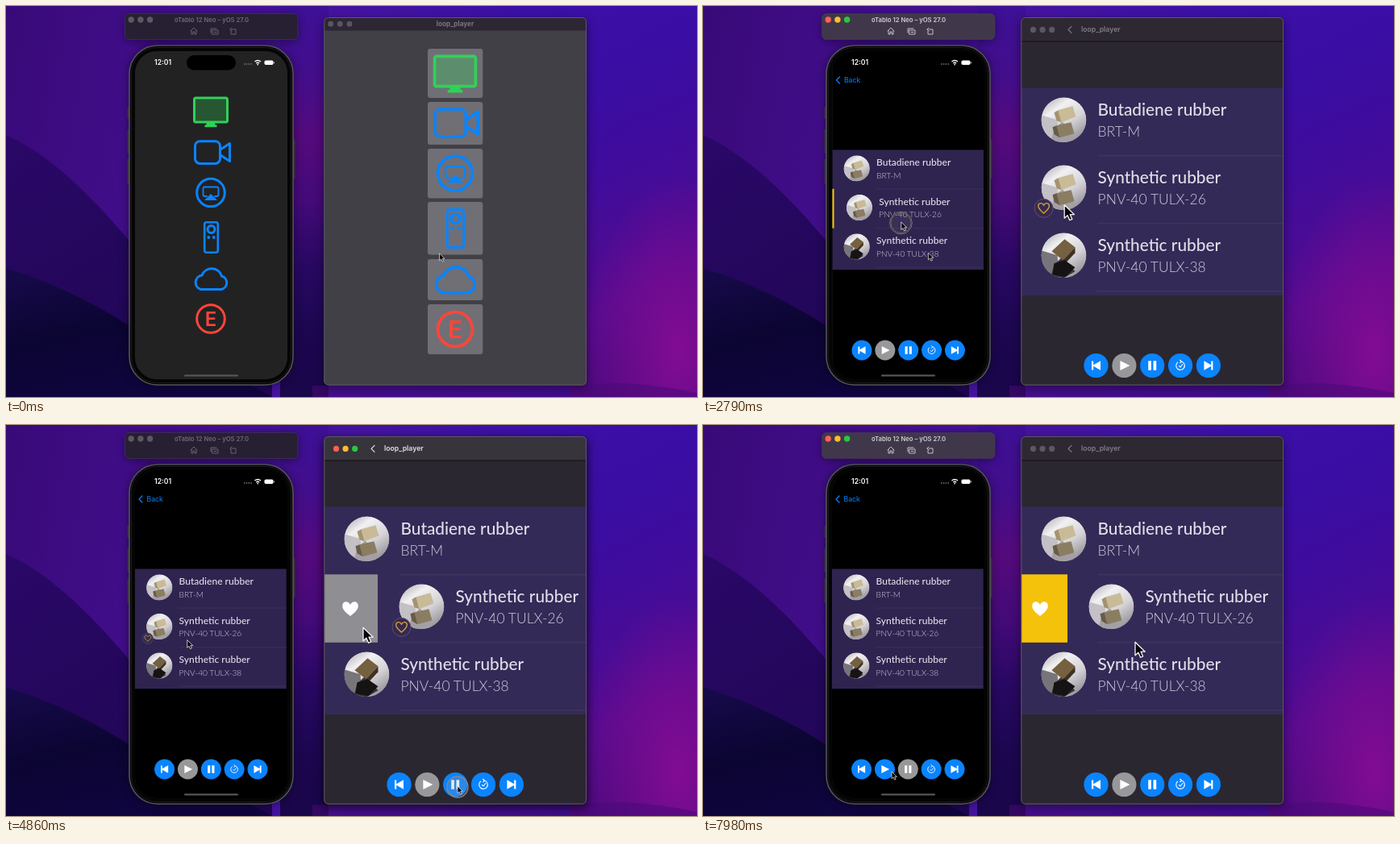
Recreate the animation shown at these times as an HTML page. Size 857 px wide and 485 px high, loop 8000 ms.

```html
<!DOCTYPE html>
<html lang="en">
<head>
<meta charset="utf-8">
<title>Loop player demo</title>
<style>
html, body { margin: 0; width: 100%; height: 100%; overflow: hidden; background: #1c0850; }
svg { display: block; width: 100vw; height: 100vh; }
text { font-family: Inter, Roboto, sans-serif; }
.list text { font-family: Lato, "Open Sans", sans-serif; }
.line { fill: none; stroke: currentColor; stroke-width: 3; stroke-linejoin: round; stroke-linecap: round; }
.solid { fill: currentColor; }
</style>
</head>
<body>
<svg id="stage" viewBox="0 0 857 485"></svg>
<script>
const LOOP = 8000;
const BLUE = '#0a84ff', GREEN = '#30d158', RED = '#ff453a', GRAY = '#98989b';
const LIGHTS = ['#ff5f57', '#febc2e', '#28c840'];

const at = (x, y, body, scale = 1) =>
  `<g transform="translate(${x} ${y}) scale(${scale})">${body}</g>`;
const rect = (x, y, w, h, r, attrs) =>
  `<rect x="${x}" y="${y}" width="${w}" height="${h}" rx="${r}" ${attrs}/>`;
const circle = (x, y, r, attrs) => `<circle cx="${x}" cy="${y}" r="${r}" ${attrs}/>`;
const path = (d, attrs) => `<path d="${d}" ${attrs}/>`;
const label = (x, y, size, fill, body, attrs = '') =>
  `<text x="${x}" y="${y}" font-size="${size}" fill="${fill}" ${attrs}>${body}</text>`;

const HEART = 'M0 9C-3 6-10 2-10-4C-10-10-3-11 0-5.500C3-11 10-10 10-4C10 2 3 6 0 9Z';
const ARROW = 'M0 0V16.500L3.900 13L6.600 19L9.700 17.700L7.100 11.900H12.300Z';

const arrow = path(ARROW, 'fill="#050505" stroke="#f4f2f5" stroke-width="1.3" stroke-linejoin="round"');

// Menu icons, centred on 0,0
const icons = [
  [GREEN, rect(-20.5, -17, 41, 30, 2, 'class="line" style="fill:currentColor;fill-opacity:.3"') +
    path('M-5 13H5L5.500 16.500H7.500V19.300H-7.500V16.500H-5.500Z', 'class="solid"')],
  [BLUE, rect(-21.5, -13.7, 31, 27.6, 6, 'class="line"') + path('M10-3.500L21.500-11V11L10 3.500', 'class="line"')],
  [BLUE, circle(0, 0, 17.3, 'class="line"') +
    path('M-5 4.500H-7.500Q-9.500 4.500-9.500 2.500V-5Q-9.500-7-7.500-7H7.500Q9.500-7 9.500-5V2.500Q9.500 4.500 7.500 4.500H5',
      'class="line" style="stroke-width:1.8"') +
    path('M0 1.500L8 9.500H-8Z', 'class="solid"')],
  [BLUE, rect(-8.3, -18.8, 16.6, 37.6, 2.5, 'class="line" style="stroke-width:2.6"') +
    circle(0, -10, 4.5, 'class="line"') + circle(-3.2, 0, 1.9, 'class="solid"') + circle(3.2, 0, 1.9, 'class="solid"')],
  [BLUE, path('M-13 13H12.500A8.500 8.500 0 0 0 13-3.500A13 13 0 0 0-11.500-4.500A9 9 0 0 0-13 13Z', 'class="line"')],
  [RED, circle(0, 0, 17.3, 'class="line"') +
    label(0, 8.6, 24, 'currentColor', 'E', 'text-anchor="middle" font-weight="600"')]
];
const icon = (i, x, y, scale) => `<g color="${icons[i][0]}">${at(x, y, icons[i][1], scale)}</g>`;

// Transport buttons
const glyphs = [
  path('M-5.500-5.500H-3.300V-.8L5.500-5.800V5.800L-3.300 .8V5.500H-5.500Z', 'fill="#fff"'),
  path('M-5-6L7 0L-5 6Z', 'fill="#fff"'),
  path('M-5-5.800H-1.300V5.800H-5ZM1.300-5.800H5V5.800H1.300Z', 'fill="#fff"'),
  path('M1.500-5A5.300 5.300 0 1 1-3-4.300M1.500-5L-.8-7M1.500-5L-.6-2.800M-2 .2L0 2L3-2',
    'fill="none" stroke="#fff" stroke-width="1.100"'),
  path('M5.500-5.500H3.300V-.8L-5.500-5.800V5.800L3.300 .8V5.500H5.500Z', 'fill="#fff"')
];
const controls = id => glyphs.map((g, i) =>
  at((i - 2) * 34.85, 0, circle(0, 0, 15.1, `id="${id}Btn${i}" fill="${i === 1 ? GRAY : BLUE}"`) + g)).join('');

// A round photo of two blocks
const photo = dark => {
  const [top, side, low, shade] = dark
    ? ['#75603f', '#3e3022', '#151314', '#39363a'] : ['#c9bb97', '#a3936f', '#8b7d62', '#a39fa5'];
  return `<g clip-path="url(#disc)">${circle(0, 0, 28, 'fill="url(#paper)"')}` +
    path('M-28-6L-8 0L-6 28H-28Z', `fill="${dark ? '#77747a' : '#c3c0c6'}"`) +
    path('M-12 12L-2 2L14 20L0 28L-16 26Z', `fill="${shade}"`) +
    (dark
      ? path('M-15-5L1-20L14-10L-1 6Z', `fill="${top}"`) + path('M-1 6L14-10V-3L1 11Z', `fill="${side}"`) +
        path('M-12 10L1 6L14 15L2 27L-14 24Z', `fill="${low}"`)
      : path('M-7-12L11-17L15-4L-3 3Z', `fill="${top}"`) + path('M-7-12L-3 3L-9 1L-12-9Z', `fill="${side}"`) +
        path('M-9 7L9 3L13 17L-5 22Z', `fill="${low}"`) + path('M-9 7L-5 22L-12 18L-14 9Z', 'fill="#675b48"')) +
    '</g>';
};

const row = (y, title, sub, dark) => at(52.500, y + 40, photo(dark)) +
  label(94.500, y + 34.500, 20.800, '#e2dee8', title, 'font-weight="500"') +
  label(94.500, y + 61, 17.500, '#cfc9dc', sub, 'font-weight="300"');

const list = (id, bg) => `<g class="list" clip-path="url(#listBox)">
  ${rect(0, 0, 325, 258, 0, `fill="${bg}"`)}
  ${path('M94 84.500H325M94 168.500H325M94 252.500H325', 'stroke="#44395f" stroke-width="1"')}
  ${row(0, 'Butadiene rubber', 'BRT-M')}
  <g id="${id}Row">${row(84, 'Synthetic rubber', 'PNV-40 TULX-26')}
    <g id="${id}Badge">${at(27.500, 149.500, circle(0, 0, 11.500, 'fill="#352b50" stroke="#665a78" stroke-width=".8"') +
      path(HEART, 'fill="none" stroke="#dca03a" stroke-width="2" transform="scale(.68)"'))}</g></g>
  ${row(168, 'Synthetic rubber', 'PNV-40 TULX-38', true)}
  <g id="${id}Action">${rect(-100, 84, 98, 84.500, 0, `id="${id}Fill"`)}
    ${at(-36, 127, path(HEART, 'fill="#fff"'), .98)}</g>
  <g id="${id}Hand"><g id="${id}Ring">${circle(-.5, 2, 23.500, 'fill="#fff" fill-opacity=".05" stroke="#17131f" stroke-width="3"') +
    circle(-.5, 2, 24, 'fill="none" stroke="#c9c3a6" stroke-width="1"') +
    circle(-.5, 2, 21.800, 'fill="none" stroke="#c9c3a6" stroke-width=".7"')}</g>${arrow}</g>
</g>`;

const lamps = (id, x, y, step, r) => LIGHTS.map((c, i) => circle(x + i * step, y, r, `class="${id}Lamp"`)).join('');
const chevron = (x, y, color) =>
  path(`M${x + 4} ${y - 4}L${x} ${y}L${x + 4} ${y + 4}`, `class="line" color="${color}" style="stroke-width:1.2"`);

const wallpaper = `
  ${rect(0, 0, 857, 485, 0, 'fill="url(#sky)"')}
  ${path('M0 160Q70 190 160 300L330 400V485H0Z', 'fill="url(#hill)"')}
  ${path('M0 325Q80 350 150 395Q250 440 330 485H0Z', 'fill="url(#dark)"')}
  ${rect(340, 0, 60, 485, 0, 'fill="url(#gap)"')}
  ${rect(700, 0, 157, 485, 0, 'fill="url(#side)"')}
  ${rect(700, 200, 157, 285, 0, 'fill="url(#glow)"')}
  ${path('M380 485V471H715Q770 462 857 480V485Z', 'fill="#4a0a78" opacity=".55"')}`;

const phone = `
  ${rect(151, 47, 207, 426, 37, 'fill="#000" opacity=".35" filter="url(#blur)"')}
  ${[[150.500, 125, 15], [150.500, 153, 30], [150.500, 190, 31], [355.500, 165, 49]]
    .map(([x, y, h]) => rect(x, y, 3, h, 1, 'fill="#35323a"')).join('')}
  ${rect(153, 49, 203, 421, 35, 'fill="#050505" stroke="#56545a" stroke-width="1.600"')}
  ${rect(155.500, 51.500, 198, 416, 32, 'fill="none" stroke="#1c1c1e" stroke-width="1"')}
  <g clip-path="url(#screen)">
    <g id="phoneMenu">${rect(160, 56, 189, 407, 0, 'fill="#222223"')}
      ${[[254, 131], [256, 181.500], [254, 231.500], [254.500, 287], [254.500, 338.500], [254, 388]]
        .map(([x, y], i) => icon(i, x, y, 1)).join('')}</g>
    <g id="phonePage">${rect(160, 56, 189, 407, 0, 'fill="#000"')}
      ${chevron(165, 92, BLUE)}${label(174.500, 95.200, 8.700, BLUE, 'Back')}
      ${at(160, 178.300, list('phone', '#2f2450'), .578)}
      ${at(254.300, 427, controls('phone'), .828)}</g>
  </g>
  ${rect(224, 61, 61, 18.500, 9.250, 'fill="#000"')}
  ${label(184, 73, 8.600, '#fff', '12:01', 'font-weight="600"')}
  ${path('M295 72H305', 'stroke="#77777a" stroke-width="1.300" stroke-dasharray="1.500 1.300"')}
  ${path('M308.500 69Q312.200 65.800 316 69M310.300 71Q312.200 69.500 314.200 71', 'fill="none" stroke="#fff" stroke-width="1.400"')}
  ${circle(312.200, 72.600, .9, 'fill="#fff"')}
  ${rect(320.500, 67.500, 11, 5.500, 1.800, 'fill="#fff"')}${rect(332, 69.200, 1, 2.200, .4, 'fill="#aaa"')}
  ${rect(221, 457.300, 67, 2.200, 1.100, 'fill="#565658"')}
  ${rect(148, 11, 214, 33, 6, 'fill="#000" opacity=".4" filter="url(#blur)"')}
  ${rect(147.500, 9.500, 214.500, 32, 5.500, 'id="toolbar" stroke="#4b4354" stroke-opacity=".5"')}
  ${lamps('phone', 155.200, 17, 11.700, 3.700)}
  <g id="toolText">${label(209, 19.700, 7.700, 'currentColor', 'oTablo 12 Neo – yOS 27.0', 'font-weight="600"')}
    ${path('M229 31L233 27L237 31M230 30.500V35H232V32H234V35H236V30.500', 'class="line" style="stroke-width:.9"')}
    ${path('M254 33V28H261M256 30H263V35H256ZM258 32.500H261', 'class="line" style="stroke-width:.9"')}
    ${path('M280 29H285V35H279V31M278 29L280 27M278 29L280 31', 'class="line" style="stroke-width:.9"')}</g>`;

const desktop = `
  ${rect(393, 17, 329, 458, 7, 'id="deskShadow" fill="#000" filter="url(#blur)"')}
  <g clip-path="url(#window)">
    <g id="deskMenu">${rect(394, 14, 326, 457, 0, 'fill="#414046"')}
      ${[[53, 61], [119, 53], [177, 61.500], [243, 65.500], [314, 51], [370, 62]]
        .map(([y, h]) => rect(523, y, 68.300, h, 3, 'fill="#706f75"')).join('')}
      ${[[557, 83.500], [558.500, 145], [557, 207.500], [557.500, 276], [557.500, 339.500], [557, 401]]
        .map(([x, y], i) => icon(i, x, y, 1.240)).join('')}</g>
    <g id="deskPage">${rect(394, 14, 326, 457, 0, 'fill="#2b2730"')}
      ${at(395, 101.300, list('desk', '#342a57'))}${at(557.200, 446, controls('desk'))}</g>
    <g id="menuBar">${rect(394, 14, 326, 16.500, 0, 'fill="#2c2733"')}
      ${[402.700, 414.300, 426].map(x => circle(x, 22.200, 3.400, 'fill="#5b5561"')).join('')}
      ${label(557, 25.200, 8.300, '#837e89', 'loop_player', 'text-anchor="middle" font-weight="600"')}</g>
    <g id="pageBar">${rect(394, 14, 326, 30, 0, 'id="barFill"')}${rect(394, 43.500, 326, 1, 0, 'fill="#111014"')}
      ${lamps('desk', 409.500, 29.400, 11.600, 3.600)}
      <g id="barText">${chevron(453, 29.300, 'currentColor')}
      ${label(469, 32.300, 8.700, 'currentColor', 'loop_player', 'font-weight="600"')}</g></g>
  </g>
  ${rect(394.800, 14.500, 324.700, 455.500, 5, 'fill="none" stroke="#5d5863" stroke-width="1"')}`;

const stops = colors => colors.map((c, i) =>
  `<stop offset="${i / (colors.length - 1)}" stop-color="${c}"/>`).join('');
const fade = (id, colors, x2, y2) =>
  `<linearGradient id="${id}" x1="0" y1="0" x2="${x2}" y2="${y2}">${stops(colors)}</linearGradient>`;
const clip = (id, body) => `<clipPath id="${id}">${body}</clipPath>`;

document.getElementById('stage').innerHTML = `<defs>
  ${fade('sky', ['#380a78', '#420e8c', '#4414a0', '#3b10a6', '#340eaa'], 1, .1)}
  ${fade('hill', ['#2a0868', '#24075c', '#200654'], .6, 1)}
  ${fade('dark', ['#180a4c', '#0b0532', '#100540'], .5, 1)}
  ${fade('gap', ['#3d1096', '#420e8c', '#540a7c', '#430a78', '#280862', '#1c0750', '#1a064a'], 0, 1)}
  ${fade('side', ['#3c10a6', '#3a0ea4', '#3e0c9e', '#480c96', '#560b8e', '#4c0a7e'], .15, 1)}
  <radialGradient id="glow" cx=".85" cy=".8" r=".75"><stop offset="0" stop-color="#820c94"/>
    <stop offset="1" stop-color="#820c94" stop-opacity="0"/></radialGradient>
  ${fade('paper', ['#a5a2a8', '#f1f0f2', '#d5d3d7', '#96939a'], .7, 1)}
  ${clip('disc', circle(0, 0, 28, ''))}${clip('listBox', rect(0, 0, 325, 258, 0, ''))}
  ${clip('screen', rect(160, 56, 189, 407, 27, ''))}${clip('window', rect(394.500, 14, 325.500, 456.500, 5, ''))}
  <filter id="blur" x="-20%" y="-20%" width="140%" height="140%"><feGaussianBlur stdDeviation="6"/></filter>
  </defs>${wallpaper}${phone}${desktop}
  <g id="mouse"><circle id="press" cx="0" cy="1" r="13" fill="#999" fill-opacity=".22" stroke="#8d8589" stroke-width="1.300"/>
  <g transform="scale(.53)">${arrow}</g></g>`;

const $ = id => document.getElementById(id);
const set = (id, name, value) => $(id).setAttribute(name, value);
const show = (id, on) => set(id, 'visibility', on ? 'inherit' : 'hidden');
const move = (id, x, y = 0) => set(id, 'transform', `translate(${x.toFixed(2)} ${y.toFixed(2)})`);
const within = (t, a, b) => t >= a && t < b;
const ease = u => u * u * (3 - 2 * u);
const slide = (t, start, span) => 1 - (1 - Math.min(1, Math.max(0, (t - start) / span))) ** 3;

// Keys are [time, ...values]
function track(keys, t) {
  let i = 0;
  while (i < keys.length - 2 && t >= keys[i + 1][0]) i++;
  const [a, b] = [keys[i], keys[i + 1]];
  const u = ease(Math.min(1, Math.max(0, (t - a[0]) / (b[0] - a[0]))));
  return a.slice(1).map((v, k) => v + (b[k + 1] - v) * u);
}

const mousePath = [[0, 537.500, 307], [380, 556, 287], [720, 556, 287], [1200, 314, 384], [1900, 253.500, 291],
  [2600, 253.500, 291], [3660, 555.500, 467], [4300, 560, 448], [4980, 560, 448], [5280, 523, 446],
  [5550, 523, 446], [6100, 400, 476], [6650, 236, 426], [6900, 238, 425], [7080, 252, 427],
  [7300, 252, 427], [7650, 234, 430]];
const clicks = [[400, 560], [2250, 2420], [4800, 4960], [5340, 5480], [7090, 7230]];

const handPath = [[1000, 130, 153], [1230, 130, 153], [1400, 190, 160], [1550, 141, 168], [2160, 78, 153],
  [2250, 50, 145], [2700, 50, 145], [3360, 112, 153], [3560, 144, 160], [3680, 144, 160], [3860, 204, 165],
  [4020, 141, 168], [4600, 78, 158], [4780, 48, 150], [5060, 48, 150], [5400, 78, 165]];
const swipe = [[1230, 0], [1550, 59], [1650, 67], [2440, 67], [2800, 0], [3680, 0], [4000, 59], [4120, 68],
  [5080, 68], [5400, 15.500], [5460, 0]];

const DEMO_START = 900, DEMO_SPAN = 5930;

function drawDemo(id, t) {
  if (t >= DEMO_START) t = DEMO_START + (t - DEMO_START) % DEMO_SPAN;
  const [shift] = track(swipe, t);
  move(id + 'Row', shift);
  move(id + 'Action', shift);
  show(id + 'Action', shift > .5);
  set(id + 'Fill', 'fill', t < 3200 ? '#f5c20b' : '#8f8e92');
  show(id + 'Badge', within(t, 2240, 4990));
  move(id + 'Hand', ...track(handPath, t));
  show(id + 'Hand', within(t, 1000, 5580));
  show(id + 'Ring', within(t, 1120, 1430) || within(t, 2195, 2280) || within(t, 3560, 3890) || within(t, 4910, 5010));
}

function drawControls(id, paused) {
  set(id + 'Btn1', 'fill', paused ? BLUE : GRAY);
  set(id + 'Btn2', 'fill', paused ? GRAY : BLUE);
}

function lightUp(id, on) {
  document.querySelectorAll(`.${id}Lamp`).forEach((el, i) => el.setAttribute('fill', on ? LIGHTS[i] : '#5d5763'));
}

function draw(t) {
  const deskOn = within(t, 520, 2290) || within(t, 4800, 7100);
  const phoneOn = within(t, 2340, 4800) || t >= 7100;
  lightUp('desk', deskOn);
  lightUp('phone', phoneOn);
  set('barFill', 'fill', deskOn ? '#38343b' : '#2d2831');
  set('barText', 'color', deskOn ? '#e2dfe4' : '#817b86');
  set('deskShadow', 'opacity', deskOn ? .6 : .35);
  set('toolbar', 'fill', phoneOn ? '#40384a' : '#271f32');
  set('toolText', 'color', phoneOn ? '#d2ccd6' : '#716979');

  const deskIn = slide(t, 540, 400), phoneIn = slide(t, 2400, 450);
  show('menuBar', t < 540);
  show('pageBar', t >= 540);
  show('deskPage', t >= 540);
  show('phonePage', t >= 2400);
  move('deskPage', 326 * (1 - deskIn));
  move('deskMenu', -108 * deskIn);
  move('phonePage', 189 * (1 - phoneIn));
  move('phoneMenu', -63 * phoneIn);

  drawDemo('desk', t < 4930 ? t : Math.max(4930, t - 500));
  drawDemo('phone', Math.min(t, 7150) - 1500);
  drawControls('desk', within(t, 4930, 5430));
  drawControls('phone', t >= 7150);

  move('mouse', ...track(mousePath, t));
  show('press', clicks.some(([a, b]) => within(t, a, b)));
}

const begin = performance.now();
function tick() {
  draw((performance.now() - begin) % LOOP);
  requestAnimationFrame(tick);
}
tick();
</script>
</body>
</html>
```
